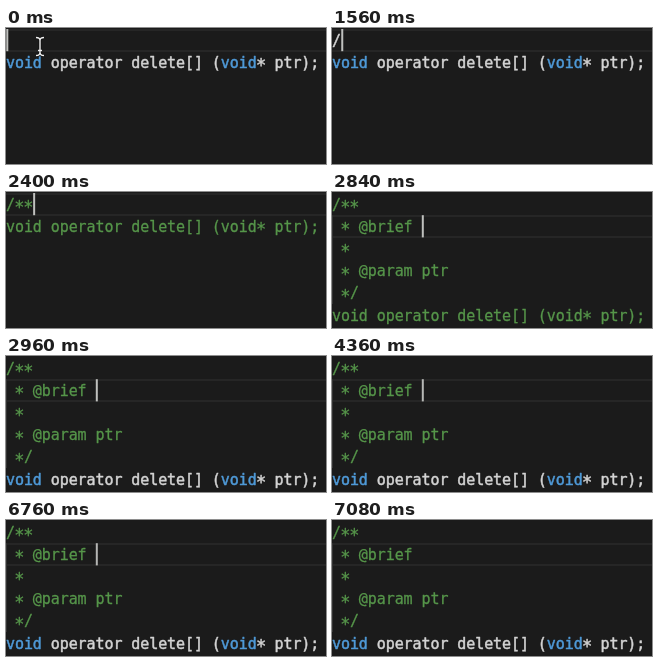
An HTML page with a canvas for the animation above (8 s loop, 320 px wide and 136 px high).

```html
<!DOCTYPE html>
<html lang="en">
<head>
<meta charset="utf-8">
<title>Doc comment expansion</title>
<style>
  html, body { margin: 0; width: 100%; height: 100%; overflow: hidden; background: #1b1b1b; }
  canvas { display: block; width: 320px; height: 136px; }
</style>
</head>
<body>
<canvas id="stage" width="320" height="136"></canvas>
<script>
const ctx = document.getElementById('stage').getContext('2d');
const LOOP = 8000, TICK = 40;
const PITCH = 8.95, LINE = 22.2, TOP = 1, BASE = 16.5;
const BG = '#1b1b1b', EDGE = '#262626', GUIDE = '#333', CARET = '#bfc0be';
const PLAIN = '#d4d4d4', BLUE = '#4f9ad8', GREEN = '#56964a';
const CODE = ['void', ' operator delete[] (', 'void', '* ptr);'];
const DOC = ['/**', ' * @brief', ' *', ' * @param ptr', ' */'];

const ramp = (t, from, to) => Math.min(1, Math.max(0, (t - from) / (to - from)));
const lineTop = row => TOP + row * LINE;
const setFont = size => { ctx.font = size + 'px "DejaVu Sans Mono", monospace'; };

function write(text, row, color, col = 0) {
  ctx.fillStyle = ctx.strokeStyle = color;
  ctx.lineWidth = color === GREEN ? 0.3 : 0.5;
  [...text].forEach((ch, i) => {
    // asterisks are larger and sit on the middle of the line
    const star = ch === '*';
    setFont(star ? 17 : 15);
    const x = (col + i) * PITCH - (star ? 0.6 : 0);
    const y = lineTop(row) + BASE + (star ? 3.5 : 0);
    ctx.fillText(ch, x, y);
    ctx.strokeText(ch, x, y);
  });
}

function declaration(row, commented) {
  let col = 0;
  for (const part of CODE) {
    const color = commented ? GREEN : part === 'void' ? BLUE : PLAIN;
    write(part, row, color, col);
    col += part.length;
  }
}

function highlight(row) {
  ctx.fillStyle = EDGE;
  ctx.fillRect(0, Math.round(lineTop(row)), 320, 2);
  ctx.fillRect(0, Math.round(lineTop(row + 1)) - 1, 320, 2);
}

function indentGuide(from, to) {
  ctx.fillStyle = GUIDE;
  ctx.fillRect(0, lineTop(from), 1, lineTop(to) - lineTop(from));
}

function caret(row, col, alpha) {
  ctx.globalAlpha = alpha;
  ctx.fillStyle = CARET;
  ctx.fillRect(col * PITCH + 0.3, lineTop(row), 2, LINE);
  ctx.globalAlpha = 1;
}

function pointer(x, y) {
  const p = new Path2D();
  p.moveTo(x - 4, y - 9);
  p.quadraticCurveTo(x, y - 9, x, y - 6);
  p.quadraticCurveTo(x, y - 9, x + 4, y - 9);
  p.moveTo(x, y - 6);
  p.lineTo(x, y + 6);
  p.moveTo(x - 4, y + 9);
  p.quadraticCurveTo(x, y + 9, x, y + 6);
  p.quadraticCurveTo(x, y + 9, x + 4, y + 9);
  p.moveTo(x - 2, y + 4);
  p.lineTo(x + 2, y + 4);
  for (const [width, color] of [[3, '#111'], [1.4, '#f0f0f0']]) {
    ctx.lineWidth = width;
    ctx.strokeStyle = color;
    ctx.stroke(p);
  }
}

function blink(t) {
  if (t < 5280) return 1 - ramp(t, 4340, 4720);
  if (t < 6480) return ramp(t, 5790, 6160);
  return 1 - ramp(t, 6740, 7080);
}

function draw(t) {
  ctx.fillStyle = BG;
  ctx.fillRect(0, 0, 320, 136);
  ctx.textBaseline = 'alphabetic';
  ctx.lineJoin = 'round';

  if (t < 2840) {
    const typed = t < 600 ? 0 : t < 1760 ? 1 : t < 2080 ? 2 : 3;
    const commented = t >= 1840;
    highlight(0);
    write(DOC[0].slice(0, typed), 0, commented ? GREEN : PLAIN);
    declaration(1, commented);
    caret(0, typed, 1);
    if (t < 600) pointer(34, 18.5);
  } else {
    highlight(1);
    indentGuide(1, 5);
    DOC.forEach((text, row) => write(text, row, GREEN));
    declaration(5, t < 2920);
    caret(1, 10, blink(t));
  }
}

const start = performance.now();
function frame() {
  const t = (performance.now() - start) % LOOP;
  draw(Math.floor(t / TICK) * TICK);
  requestAnimationFrame(frame);
}
frame();
</script>
</body>
</html>
```
